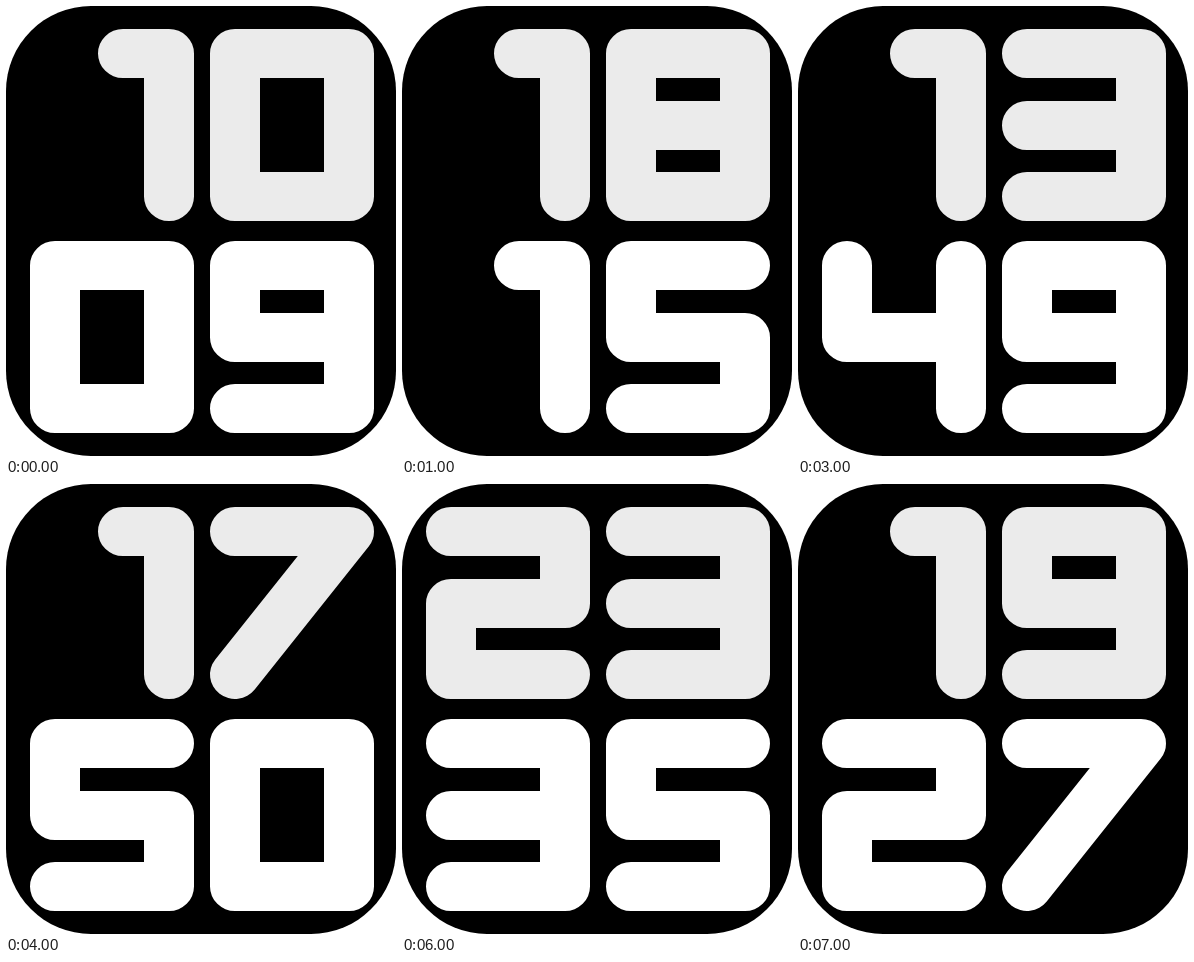
An HTML page with a canvas for the animation above (8 s loop, 390 px wide and 450 px high).

```html
<!DOCTYPE html>
<html lang="en">
<head>
<meta charset="utf-8">
<title>Block clock</title>
<style>
  html, body { margin: 0; width: 100%; height: 100%; overflow: hidden; background: #fff; }
  canvas { display: block; width: 390px; height: 450px; }
</style>
</head>
<body>
<canvas id="stage" width="390" height="450"></canvas>
<script>
const ctx = document.getElementById('stage').getContext('2d');

// Points of the digit grid; every digit is one or more thick polylines.
const LEFT = 25, RIGHT = 139, TOP = 24.5, MIDDLE = 96.5, BOTTOM = 167.5;
const points = {
  a: [LEFT, TOP], b: [RIGHT, TOP],
  c: [LEFT, MIDDLE], d: [RIGHT, MIDDLE],
  e: [LEFT, BOTTOM], f: [RIGHT, BOTTOM],
  n: [93, TOP]
};
const digits = [
  'abfeab', 'nbf', 'abdcef', 'abfe cd', 'acd bf',
  'bacdfe', 'baefdc', 'abe', 'abfeab cd', 'dcabfe'
];

const times = ['1009', '1815', '0332', '1349', '1750', '0826', '2335', '1927'];
const STEP = 1000;

function drawDigit(digit, x, y, color) {
  ctx.save();
  ctx.translate(x, y);
  ctx.beginPath();
  for (const line of digits[digit].split(' ')) {
    [...line].forEach((key, i) => ctx[i ? 'lineTo' : 'moveTo'](...points[key]));
  }
  // Horizontal bars are slightly thinner than vertical stems.
  ctx.scale(1, 0.98);
  ctx.lineWidth = 50;
  ctx.lineCap = ctx.lineJoin = 'round';
  ctx.strokeStyle = color;
  ctx.stroke();
  ctx.restore();
}

function draw(ms) {
  const time = times[Math.floor(ms / STEP) % times.length];
  ctx.fillStyle = '#fff';
  ctx.fillRect(0, 0, 390, 450);
  ctx.fillStyle = '#000';
  ctx.beginPath();
  ctx.roundRect(0, 0, 390, 450, 85);
  ctx.fill();
  [...time].forEach((digit, i) => {
    const row = i >> 1;
    drawDigit(digit, 24 + (i % 2) * 180, 23 + row * 212, row ? '#fff' : '#ebebeb');
  });
}

const start = performance.now();
function tick() {
  draw(performance.now() - start);
  requestAnimationFrame(tick);
}
tick();
</script>
</body>
</html>
```
